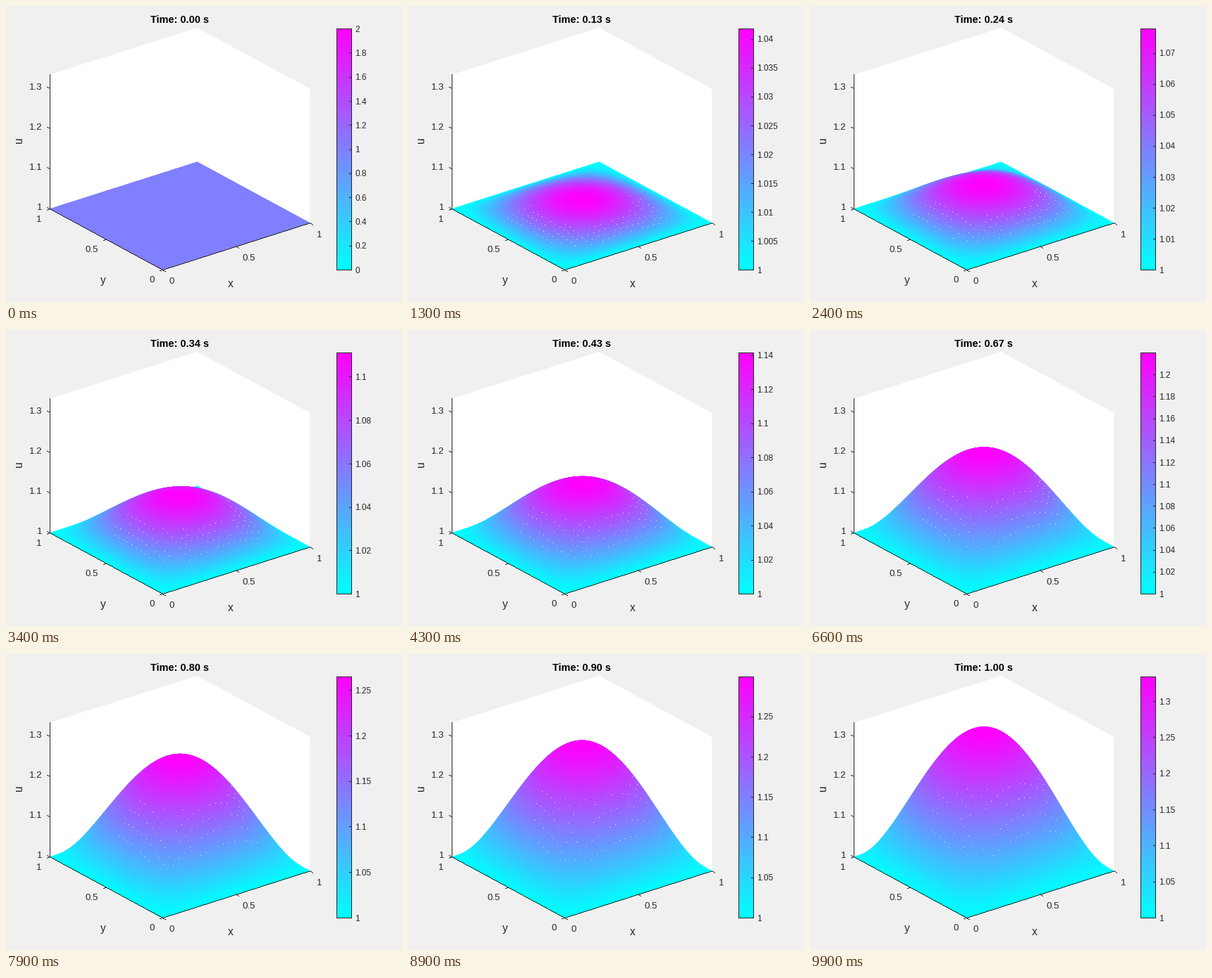
Recreate the animation shown at these times as a matplotlib script. Size 562 by 421 pixels, loop 10 s.

```python
import numpy as np
import matplotlib.pyplot as plt
from matplotlib.animation import FuncAnimation

W, H, DPI = 562, 421, 100
FRAMES = 100
INK = "#262626"
PX = 72 / DPI

# Orthographic projection of the unit box, in pixels
ORIGIN = np.array([222.3, 375.5])
EX = np.array([209, -66.7])
EY = np.array([-160, -86.8])
UNIT = 572
TOP = 0.334 * UNIT

plt.rcParams["font.family"] = "Liberation Sans"
fig = plt.figure(figsize=(W / DPI, H / DPI), dpi=DPI, facecolor="#f0f0f0")
ax = fig.add_axes([0, 0, 1, 1])
ax.set_xlim(0, W)
ax.set_ylim(H, 0)
ax.axis("off")


def project(x, y, rise=0):
    px = ORIGIN[0] + EX[0] * x + EY[0] * y
    py = ORIGIN[1] + EX[1] * x + EY[1] * y - rise
    return px, py


def stroke(layer, p, q):
    """One-pixel line without smoothing."""
    (x0, y0), (x1, y1) = p, q
    n = int(max(abs(x1 - x0), abs(y1 - y0))) + 1
    rows = np.linspace(y0, y1, n).astype(int)
    cols = np.linspace(x0, x1, n).astype(int)
    layer[rows, cols] = (38, 38, 38, 255)


def label(x, y, s, size, ha="center", **kw):
    kw = {"color": INK, "va": "baseline", "zorder": 6, **kw}
    return ax.text(x, y, s, fontsize=size * PX, ha=ha, **kw)


def tick_label(x, mid, s, size=13.3, ha="center"):
    return label(x, mid + 0.35 * size, s, size, ha)


def bump(x, y):
    return 16 * x * (1 - x) * y * (1 - y)


def depth_slope(x, y):
    return 8 * ((1 - 2 * x) * y * (1 - y) + (1 - 2 * y) * x * (1 - x))


def height(t):
    return t * (0.3145 + 0.0305 * t - 0.0109 * t * t)


def nice_step(span):
    for e in range(-6, 1):
        for m in (1, 2, 5):
            if span / (m * 10.0 ** e) <= 11.02:
                return m * 10.0 ** e


# Surface grid, ordered from back to front
v = np.linspace(1, 0, 61)
gx, gy = np.meshgrid(v, v)
shape = bump(gx, gy)

# Coarser grid for the speckles
w = np.linspace(0, 1, 27)
sx, sy = np.meshgrid(w, w)
spot = bump(sx, sy)
PALE = np.array([(255, 250, 215, 255), (250, 225, 205, 255), (255, 215, 250, 255)])

# Walls, axes and their labels
walls = [project(0, 1, TOP), project(1, 1, TOP), project(1, 0, TOP),
         project(1, 0), project(0, 0), project(0, 1)]
ax.fill(*zip(*walls), color="white", lw=0, zorder=1)

base = np.zeros((H, W, 4), np.uint8)
stroke(base, project(0, 1, TOP), project(0, 1))
stroke(base, project(0, 1), project(0, 0))
stroke(base, project(0, 0), project(1, 0))

for i, s in enumerate(("1", "1.1", "1.2", "1.3")):
    x, y = project(0, 1, 0.1 * UNIT * i)
    stroke(base, (x, y), (x - 4, y - 2))
    tick_label(51.5, y - 3, s, ha="right")
for q, s, x, y in ((0, "0", 207.5, 388.5), (0.5, "0.5", 122, 345.5), (1, "1", 47, 302)):
    a, b = project(0, q)
    stroke(base, (a, b), (a - 4, b + 1.3))
    tick_label(x, y, s)
for q, s, x, y in ((0, "0", 235.5, 390.5), (0.5, "0.5", 345, 357.5), (1, "1", 444.5, 324)):
    a, b = project(q, 0)
    stroke(base, (a, b), (a + 4, b + 2.2))
    tick_label(x, y, s)
label(319, 400, "x", 15.5)
label(138, 394.5, "y", 15.5)
label(26, 190.5, "u", 15.5, "right", rotation=90, va="center")
title = label(246.5, 24, "", 14.5, color="black", weight="bold")

# Colour bar
L, R, T, B = 469, 490, 32, 375
ax.imshow(np.linspace(1, 0, 256)[:, None], cmap="cool", extent=(L, R, B, T),
          aspect="auto", interpolation="nearest", zorder=2)
corners = [(L, T), (R, T), (R, B), (L, B)]
for i, p in enumerate(corners):
    stroke(base, p, corners[i - 1])

overlay = fig.figimage(base, origin="upper", zorder=5)
parts = []


def draw_bar(layer, lo, hi):
    step = nice_step(hi - lo)
    for i in range(int((hi - lo) / step + 1e-6) + 1):
        y = B + 0.5 - (B - T) * i * step / (hi - lo)
        stroke(layer, (R - 3, y), (R, y))
        parts.append(tick_label(495.5, y, f"{lo + i * step:.6g}", 11.9, "left"))


def draw_speckles(layer, k, t, amp):
    rng = np.random.default_rng(k)
    seen = (spot > 0.3) & (spot < 0.72) & (sx + sy < 1.2)
    seen &= (sy < 0.68 - 0.16 * t) & (sx < 0.83 - 0.08 * t)
    seen &= 72 + UNIT * amp * depth_slope(sx, sy) > 0
    seen &= rng.random(spot.shape) < 0.75
    px, py = project(sx[seen], sy[seen], UNIT * amp * spot[seen])
    layer[py.astype(int), px.astype(int)] = rng.choice(PALE, px.size)


def draw(k):
    while parts:
        parts.pop().remove()
    t = k / (FRAMES - 1)
    amp = height(t)
    lo, hi = (1, 1 + amp) if k else (0, 2)
    title.set_text(f"Time: {t:.2f} s")
    px, py = project(gx, gy, UNIT * amp * shape)
    parts.append(ax.pcolormesh(px, py, 1 + amp * shape, shading="gouraud",
                               cmap="cool", vmin=lo, vmax=hi, zorder=3))
    layer = base.copy()
    if k:
        draw_speckles(layer, k, t, amp)
    draw_bar(layer, lo, hi)
    overlay.set_data(layer)
    return parts


anim = FuncAnimation(fig, draw, frames=FRAMES, interval=100,
                     init_func=lambda: [], repeat=True, repeat_delay=0)
plt.show()
```
